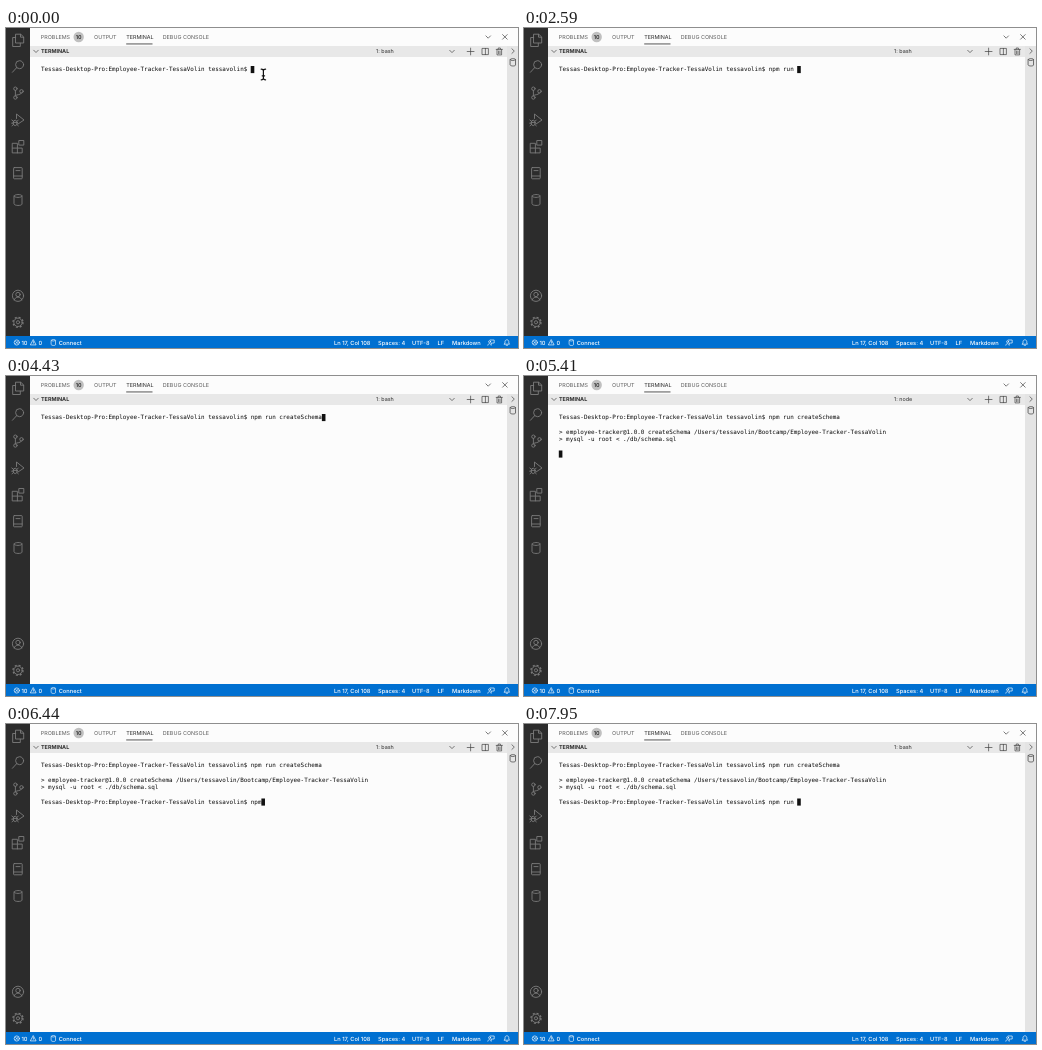
An HTML page for the animation above (8000 ms loop, 512 by 320 pixels).

```html
<!DOCTYPE html>
<html lang="en">
<head>
<meta charset="utf-8">
<title>Terminal session</title>
<style>
  html, body { margin: 0; width: 100%; height: 100%; overflow: hidden; background: #fcfcfc; }
  svg { display: block; width: 100vw; height: 100vh; }
  text { font-family: Inter, "Open Sans", sans-serif; text-rendering: geometricPrecision; white-space: pre; }
  .tabs { font-size: 5.42px; fill: #5c5c5c; }
  .on { fill: #2c2c2c; }
  .bold { font-weight: 700; }
  .badge { font-size: 5.4px; font-weight: 600; }
  .status { font-size: 5.7px; font-weight: 500; fill: #fff; }
  .term text { font: 5.91px "DejaVu Sans Mono", "Liberation Mono", monospace; fill: #080808; }
  .line { fill: none; stroke-linecap: round; stroke-linejoin: round; }
  .side { stroke: #7c7c7c; stroke-width: .9; }
  .tool { stroke: #424242; stroke-width: .7; }
  .white { stroke: #fff; stroke-width: .65; }
</style>
</head>
<body>
<svg viewBox="0 0 512 320" preserveAspectRatio="none">
  <defs>
    <path id="drum" d="M-4-4C-4-6 4-6 4-4V4C4 6-4 6-4 4ZM-4-4C-4-2 4-2 4-4"/>
    <path id="down" d="M-2.3-1.1L0 1.2 2.3-1.1"/>
  </defs>

  <rect width="512" height="320" fill="#fcfcfc"/>
  <rect x="24" y="18" width="488" height="11" fill="#e8e8e8"/>
  <rect x="501" y="18" width="11" height="291" fill="#e4e4e4"/>
  <rect width="24" height="309" fill="#2c2c2c"/>
  <rect y="308" width="512" height="12" fill="#0070d1"/>

  <!-- activity bar -->
  <g class="line side" transform="translate(-.3 0)">
    <path d="M10.2 6.2H15L18 9V15H10.2ZM14.8 6.4V9.2H17.8M10 9.5H7V18.5H14.6V15.2"/>
    <g transform="translate(12.3 38.4)"><circle cx="1.6" cy="-1.7" r="4"/><path d="M-1.3 1.2L-5.6 5.9"/></g>
    <g transform="translate(12.3 65)">
      <circle cx="-2.6" cy="-4.3" r="1.7"/><circle cx="-2.6" cy="4.5" r="1.7"/><circle cx="3.5" cy="-1.7" r="1.7"/>
      <path d="M-2.6-2.5V2.7M3.5 0C3.3 2.4-2 1-2.5 2.8"/>
    </g>
    <g transform="translate(12.3 92)">
      <path d="M-1.5-1.5V-6L6 0 0 4"/><ellipse cx="-2.8" cy="2.9" rx="2" ry="2.7"/>
      <path d="M-4.8 2.4H-.8M-4.9 1L-6.2 0M-.7 1L.3 0M-6.3 3.2H-4.9M-4.6 4.6L-6 5.8M-1 4.6L.3 5.8"/>
    </g>
    <g transform="translate(12.3 118.5)">
      <path d="M-5.4-3.2H-.6V1.6H4.2V6.4H-5.4ZM-5.4 1.6H-.6V6.4"/><rect x="1.2" y="-6" width="4.6" height="4.6"/>
    </g>
    <g transform="translate(12.3 145.2)">
      <rect x="-4.4" y="-5.6" width="8.6" height="11.2" rx=".7"/><path d="M-2-2.6H2M-4.4 2.8H4.2"/>
    </g>
    <use href="#drum" x="12.3" y="172"/>
    <g transform="translate(12.3 267.8)">
      <circle r="5.6"/><circle cy="-1.3" r="2.2"/><path d="M-3.8 4.2C-3 .3 3 .3 3.8 4.2"/>
    </g>
    <g transform="translate(12.3 294.3)">
      <circle r="4.2"/><circle r="1.6"/><circle r="5.1" stroke-width="1.2" stroke-linecap="butt" stroke-dasharray="2 2.005"/>
    </g>
  </g>

  <!-- panel tabs and terminal header -->
  <g class="tabs">
    <text x="34.8" y="11">PROBLEMS</text>
    <circle cx="72.7" cy="9" r="5.2" fill="#c0c0c0"/>
    <text class="on badge" x="72.7" y="10.9" text-anchor="middle">10</text>
    <text x="88" y="11">OUTPUT</text>
    <text class="on" x="120.2" y="11">TERMINAL</text>
    <text x="156.7" y="11">DEBUG CONSOLE</text>
    <text class="on bold" x="35" y="25.4">TERMINAL</text>
    <text class="on" id="shell" x="370" y="25.4"></text>
  </g>
  <rect x="120.2" y="15.5" width="26.3" height=".9" fill="#424242"/>
  <g class="line tool">
    <use href="#down" x="482.2" y="9"/>
    <path d="M496.6 6.6L501.2 11.2M501.2 6.6L496.6 11.2"/>
    <use href="#down" x="30" y="23.3"/>
    <use href="#down" x="446" y="23.4"/>
    <path d="M461.2 23.5H468M464.6 20.1V26.9"/>
    <path d="M476.4 20.4H482.4V26.6H476.4ZM479.4 20.4V26.6"/>
    <path d="M490.2 21.4H496.4M492.2 21.2V20H494.4V21.2M491 21.6V26.9H495.6V21.6M492.6 23V25.6M494 23V25.6"/>
    <path d="M505.9 20.8L508.3 23.1 505.9 25.4"/>
    <use href="#drum" transform="translate(506.8 34.3) scale(.68)" stroke-width="1.1"/>
  </g>

  <!-- status bar -->
  <g class="status">
    <text x="15.4" y="316.6">10</text>
    <text x="32.4" y="316.6">0</text>
    <text x="52.7" y="316.6">Connect</text>
    <text x="328" y="316.6">Ln 17, Col 108</text>
    <text x="372" y="316.6">Spaces: 4</text>
    <text x="406" y="316.6">UTF-8</text>
    <text x="431.5" y="316.6">LF</text>
    <text x="446" y="316.6">Markdown</text>
  </g>
  <g class="line white">
    <circle cx="10.8" cy="314.5" r="2.6"/>
    <path d="M9.7 313.4L11.9 315.6M11.9 313.4L9.7 315.6"/>
    <path d="M27.4 311.9L30.1 316.9H24.7ZM27.4 313.6V315.2"/>
    <use href="#drum" transform="translate(47.3 314.5) scale(.55)" stroke-width="1.1"/>
    <path d="M484.2 312H488.2V315H486.6L485.4 316.2V315"/>
    <circle cx="483.6" cy="313.7" r="1"/>
    <path d="M481.8 317.2C482 315 485 315 485.2 317.2"/>
    <path d="M498.3 316.2H503.5L502.8 315V313.6C502.6 311.2 499.2 311.2 499 313.6V315ZM500.2 317.3H501.6"/>
  </g>

  <g class="term" id="term"></g>
  <rect id="caret" width="3.6" height="7.1" fill="#111"/>
  <path id="mouse" class="line" stroke="#111" stroke-width="1.2"
        d="M255.2 41.2Q257.4 41.2 257.4 43V50Q257.4 51.8 255.2 51.8M259.6 41.2Q257.4 41.2 257.4 43M257.4 50Q257.4 51.8 259.6 51.8M256.2 47.8H258.6"/>
</svg>

<script>
  const LOOP = 8000, LEFT = 35, TOP = 43.2, STEP = 7.3, CELL = 5.91 * 0.602;
  const $ = id => document.getElementById(id);
  const prompt = "Tessas-Desktop-Pro:Employee-Tracker-TessaVolin tessavolin$ ";
  const output = [
    "",
    "> employee-tracker@1.0.0 createSchema /Users/tessavolin/Bootcamp/Employee-Tracker-TessaVolin",
    "> mysql -u root < ./db/schema.sql",
    ""
  ];

  // One key time per typed character.
  const first = {
    text: "npm run createSchema",
    keys: [1400, 1550, 1660, 1760, 2180, 2380, 2490, 2590,
           3320, 3470, 3670, 3720, 3870, 3970, 4070, 4230, 4280, 4330, 4380, 4430]
  };
  const second = {
    text: "npm run ",
    keys: [6180, 6340, 6440, 6650, 6860, 7480, 7690, 7740]
  };
  const enter = 5050, busy = 5100, printed = 5360, ready = 5510, idle = 5610, hideMouse = 1400;

  const typed = ({ text, keys }, t) => text.slice(0, keys.filter(k => k <= t).length);

  const rows = Array.from({ length: 6 }, (_, i) => {
    const row = document.createElementNS("http://www.w3.org/2000/svg", "text");
    row.setAttribute("x", LEFT);
    row.setAttribute("y", TOP + i * STEP);
    return $("term").appendChild(row);
  });

  function screen(t) {
    const lines = [prompt + typed(first, t)];
    if (t >= printed) lines.push(...output);
    if (t >= enter) lines.push(t >= ready ? prompt + typed(second, t) : "");
    return lines;
  }

  function draw(t) {
    const lines = screen(t), last = lines.length - 1;
    rows.forEach((row, i) => {
      const s = lines[i] || "";
      if (row.textContent !== s) row.textContent = s;
    });
    $("caret").setAttribute("x", LEFT + lines[last].length * CELL - 0.2);
    $("caret").setAttribute("y", TOP - 5.2 + last * STEP);
    $("shell").textContent = t >= busy && t < idle ? "1: node" : "1: bash";
    $("mouse").style.display = t < hideMouse ? "" : "none";
  }

  const start = performance.now();
  function tick() {
    draw((performance.now() - start) % LOOP);
    requestAnimationFrame(tick);
  }
  tick();
</script>
</body>
</html>
```
